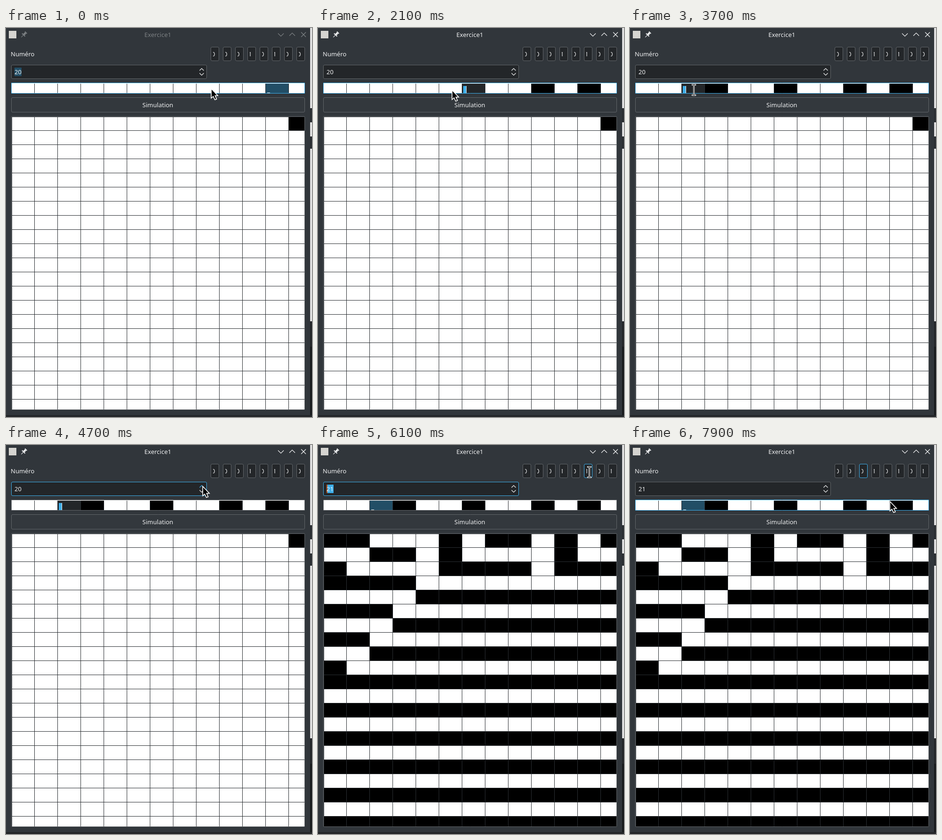
Recreate the animation shown at these times as an HTML page with a canvas. Size 649x825 px, loop 8 s.

```html
<!DOCTYPE html>
<html lang="fr">
<head>
<meta charset="utf-8">
<title>Exercice1</title>
<style>
html, body { margin: 0; width: 649px; height: 825px; overflow: hidden; background: #31363b; }
canvas { display: block; }
</style>
</head>
<body>
<canvas id="stage" width="649" height="825"></canvas>
<script>
const ctx = document.getElementById('stage').getContext('2d');
const LOOP = 8000, STEP = 100;
const C = {
  window: '#31363b', view: '#232629', text: '#eff0f1', faded: '#7c8083',
  border: '#616569', blue: '#3daee9', dimBlue: '#224e66', grid: '#2a2e32'
};

// Pointer moves: each eases on from where the last one ended
const START = { x: 435, y: 129 };
const MOVES = [
  { from: 200, to: 600, x: 474, y: 137 },
  { from: 1200, to: 1600, x: 316, y: 133 },
  { from: 1960, to: 2400, x: 183, y: 130 },
  { from: 2900, to: 3600, x: 135, y: 132 },
  { from: 3800, to: 4600, x: 417, y: 88 },
  { from: 5300, to: 5800, x: 590, y: 60 },
  { from: 5850, to: 6100, x: 575, y: 58 },
  { from: 6200, to: 6500, x: 625, y: 58 },
  { from: 6600, to: 7000, x: 494, y: 58 },
  { from: 7100, to: 7800, x: 551, y: 120 }
];

// Seed cells picked in turn; a second click opens the editor
const PICKS = [
  { col: 11, at: 0 }, { col: 9, at: 800 }, { col: 6, at: 1600 },
  { col: 3, at: 2600 }, { col: 2, at: 3300 }
];
const EDIT_DELAY = 200, ACTIVATED = 800, INCREMENTED = 4800, BIT_FOCUS = 7000;
const COLS = 13, ROWS = 21, RULE = 21;

const cellX = i => 12 + 49 * i;
const inside = (p, x, y, w, h) => p.x >= x && p.x < x + w && p.y >= y && p.y < y + h;
const ease = u => u * u * (3 - 2 * u);
const clamp = u => Math.min(1, Math.max(0, u));

// Elementary cellular automaton with empty edges; one column lies out of view
function evolve(first) {
  const rows = [first];
  while (rows.length < ROWS) {
    const prev = rows.at(-1);
    rows.push(prev.map((c, i) => RULE >> ((prev[i - 1] || 0) * 4 + c * 2 + (prev[i + 1] || 0)) & 1));
  }
  return rows;
}
const GENERATIONS = evolve([...'11000101101011'].map(Number));

function pointerAt(t) {
  let { x, y } = START;
  for (const move of MOVES) {
    const u = ease(clamp((t - move.from) / (move.to - move.from)));
    x += (move.x - x) * u;
    y += (move.y - y) * u;
  }
  return { x: Math.round(x), y: Math.round(y) };
}

function fill(x, y, w, h, color) {
  ctx.fillStyle = color;
  ctx.fillRect(x, y, w, h);
}

function frame(x, y, w, h, radius, stroke, background) {
  ctx.beginPath();
  ctx.roundRect(x + .5, y + .5, w - 1, h - 1, radius);
  if (background) { ctx.fillStyle = background; ctx.fill(); }
  ctx.strokeStyle = stroke;
  ctx.lineWidth = 1;
  ctx.stroke();
}

function line(points, color, width = 1.2) {
  ctx.beginPath();
  points.forEach(([x, y]) => ctx.lineTo(x, y));
  ctx.strokeStyle = color;
  ctx.lineWidth = width;
  ctx.stroke();
}

function text(s, x, y, color = C.text, align = 'left') {
  ctx.font = '13px "Noto Sans", sans-serif';
  ctx.textAlign = align;
  ctx.fillStyle = color;
  ctx.fillText(s, x, y);
}

function chevron(x, y, dir, color, size) {
  line([[x - size, y - dir * size / 2], [x, y + dir * size / 2], [x + size, y - dir * size / 2]], color);
}

function drawBackdrop() {
  fill(0, 0, 645, 821, C.window);
  fill(645, 0, 4, 622, '#2a2e32');
  for (const [y, h] of [[0, 170], [200, 30], [256, 366]]) fill(645, y, 4, h, '#e0e0e0');
  fill(645, 622, 4, 54, C.view);
  fill(645, 676, 4, 149, '#181a1c');
  fill(0, 821, 649, 4, C.view);
}

function drawTitleBar(t) {
  const color = t < ACTIVATED ? C.faded : C.text;
  fill(6, 6, 16, 16, '#d5d4d0');
  text('Exercice1', 322, 19, color, 'center');

  ctx.save();
  ctx.translate(38, 14);
  ctx.rotate(Math.PI / 4);
  fill(-3, -7, 6, 2, color);
  fill(-2, -5, 4, 5, color);
  fill(-4.5, 0, 9, 2, color);
  fill(-.6, 2, 1.2, 6, color);
  ctx.restore();

  chevron(583, 14.5, 1, color, 6);
  chevron(607, 13.5, -1, color, 6);
  line([[626, 9], [636, 19]], color);
  line([[636, 9], [626, 19]], color);
}

function drawBits(t, p, number) {
  [...number.toString(2).padStart(8, '0')].forEach((bit, i) => {
    const x = 434 + 26 * i;
    const lit = inside(p, x, 40, 18, 30) || (i === 2 && t >= BIT_FOCUS);
    frame(x, 40, 18, 30, 2.5, lit ? C.blue : C.border, C.view);
    ctx.save();
    ctx.beginPath();
    ctx.rect(x + 5, 42, 9, 26);
    ctx.clip();
    text(bit, x + 2, 60);
    ctx.restore();
  });
}

function drawSpinBox(t, p, number) {
  const focused = t >= INCREMENTED && t < BIT_FOCUS;
  const lit = focused || inside(p, 11, 79, 415, 29);
  frame(11, 78, 415, 30, 2.5, lit ? C.blue : C.border, C.view);
  if (t < ACTIVATED) fill(18, 84, 15, 18, C.dimBlue);
  if (focused) {
    fill(18, 84, 15, 18, C.blue);
    if ((t - INCREMENTED) % 1100 < 600) fill(18, 84, 2, 18, '#c25116');
  }
  text(number, 18, 98);
  chevron(415, 88, -1, inside(p, 405, 79, 20, 14) ? C.blue : C.text, 4.5);
  chevron(415, 98, 1, C.text, 4.5);
}

function drawSeedRow(t, p, current, editing) {
  fill(12, 117, 621, 21, '#fff');
  for (const pick of PICKS) {
    if (pick.at < current.at) fill(cellX(pick.col), 118, 48, 20, '#000');
  }
  const x = cellX(current.col);
  if (editing) {
    fill(x, 118, 48, 20, C.view);
    fill(x + 2, 123, 6, 15, C.blue);
    fill(x + 8, 123, 1, 15, C.text);
  } else {
    const dim = t < ACTIVATED || t >= INCREMENTED;
    fill(x, 118, 48, 20, dim ? C.dimBlue : C.blue);
    fill(x + 3, 137, 6, 1, C.text);
  }
  for (let i = 1; i < COLS; i++) fill(cellX(i) - 1, 118, 1, 20, C.grid);
  frame(11, 116, 623, 23, 0, inside(p, 11, 116, 623, 23) ? C.blue : C.border);
}

function drawGrid(t) {
  ctx.save();
  ctx.beginPath();
  ctx.rect(12, 188, 621, 621);
  ctx.clip();
  fill(12, 188, 621, 621, '#fff');
  for (let r = 0; r < ROWS; r++) {
    for (let c = 0; c < COLS; c++) {
      const black = t < INCREMENTED ? r === 0 && c === COLS - 1 : GENERATIONS[r][c];
      if (black) fill(cellX(c), 188 + 30 * r, 48, 29, '#000');
    }
  }
  for (let c = 1; c < COLS; c++) fill(cellX(c) - 1, 188, 1, 621, C.grid);
  for (let r = 1; r < ROWS; r++) fill(12, 187 + 30 * r, 621, 1, C.grid);
  fill(12, 188, 621, 1, C.grid);
  fill(12, 188, 1, 621, C.grid);
  ctx.restore();
  frame(11, 187, 623, 623, 1, C.border);
}

function drawArrow({ x, y }) {
  const shape = [[0, 0], [0, 20], [4.2, 16.2], [7.8, 23.5], [11.4, 22], [8.2, 14.8], [14, 14.6]];
  ctx.beginPath();
  shape.forEach(([dx, dy]) => ctx.lineTo(x + dx + .3, y + dy - .2));
  ctx.closePath();
  ctx.fillStyle = '#000';
  ctx.fill();
  ctx.strokeStyle = '#fff';
  ctx.lineWidth = 1.6;
  ctx.stroke();
}

function drawIBeam({ x, y }) {
  const bars = [[-3, -12, 7, 1], [0, -12, 1, 23], [-3, 10, 7, 1]];
  for (const [dx, dy, w, h] of bars) fill(x + dx - 1, y + dy - 1, w + 2, h + 2, '#fff');
  for (const [dx, dy, w, h] of bars) fill(x + dx, y + dy, w, h, '#000');
}

function draw(now) {
  const t = Math.floor(now % LOOP / STEP) * STEP;
  const p = pointerAt(t);
  const number = t < INCREMENTED ? RULE - 1 : RULE;
  const current = PICKS.findLast(pick => pick.at <= t);
  const editing = t >= ACTIVATED && t >= current.at + EDIT_DELAY && t < INCREMENTED;

  drawBackdrop();
  drawTitleBar(t);
  text('Numéro', 10, 60);
  drawBits(t, p, number);
  drawSpinBox(t, p, number);
  drawSeedRow(t, p, current, editing);
  frame(11, 147, 623, 32, 2.5, C.border, '#33383d');
  text('Simulation', 322, 168, C.text, 'center');
  drawGrid(t);

  const overBit = inside(p, 434, 40, 200, 30) && (p.x - 434) % 26 < 18;
  const overText = overBit || inside(p, 11, 79, 394, 29) ||
    (editing && inside(p, cellX(current.col), 118, 48, 20));
  (overText ? drawIBeam : drawArrow)(p);
}

const begin = performance.now();
function tick() {
  draw(performance.now() - begin);
  requestAnimationFrame(tick);
}
tick();
</script>
</body>
</html>
```
